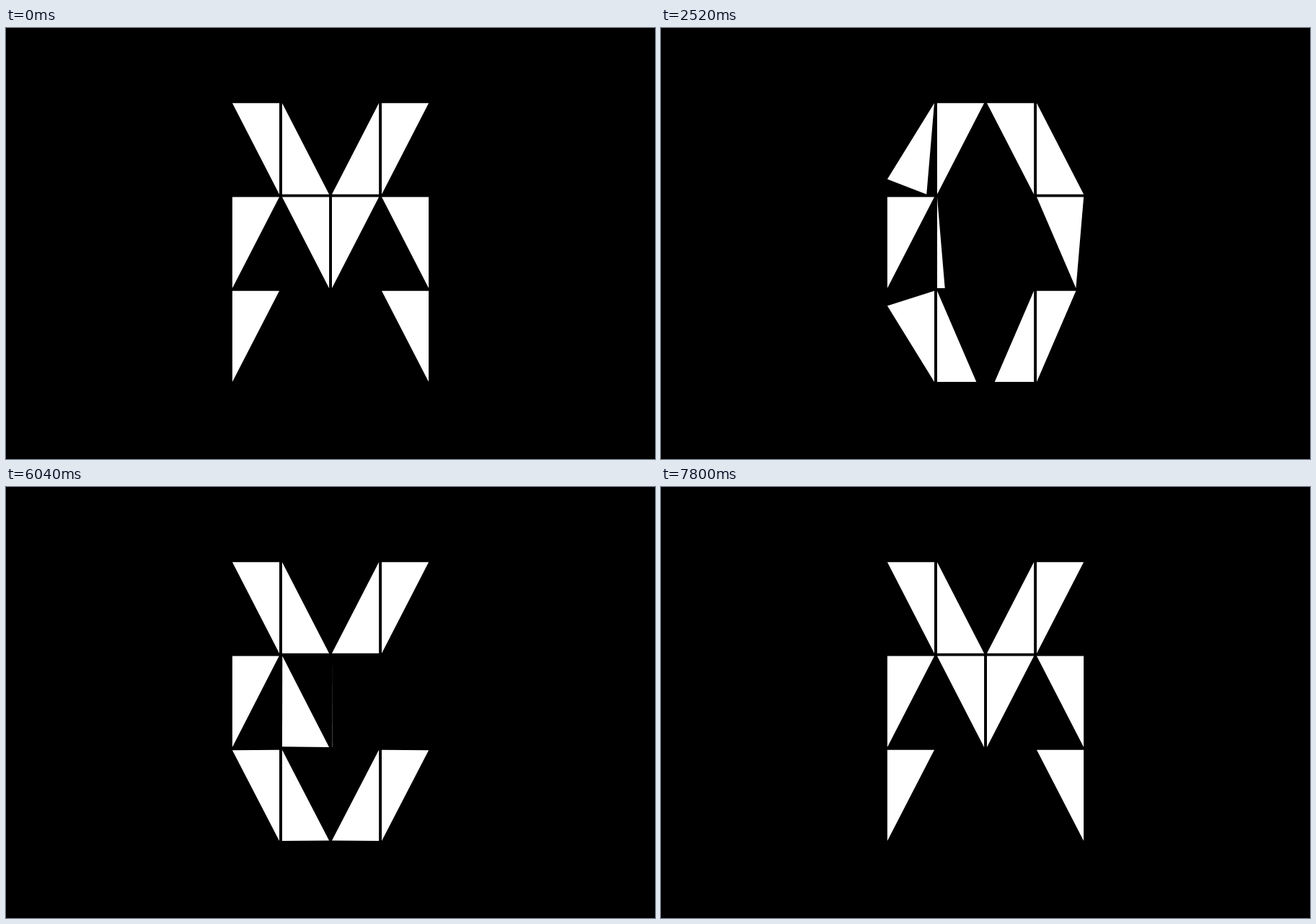
An HTML page with a canvas that plays this animation: 900x598 px, repeating every 8.44 s.

```html
<!DOCTYPE html>
<html lang="en">
<head>
<meta charset="utf-8">
<title>Triangle letters</title>
<style>
  html, body { margin: 0; width: 100%; height: 100%; overflow: hidden; background: #000; }
  canvas { display: block; }
</style>
</head>
<body>
<canvas id="stage" width="900" height="598"></canvas>
<script>
const ctx = document.getElementById('stage').getContext('2d');
const LOOP = 8440, STEP = 40, BEAT = 1200, DELAY = 15, MOVE = 560;
const LEFT = 313.9, TOP = 104.3, W = 65.1, H = 126.4, DX = 69.05, DY = 130.2;

const LETTERS = [
  '◥◣◢◤ ◤◥◤◥ ◤··◥', // M
  '◤◤◥◥ ◤◣◢◥ ◤··◥', // A
  '◢◤◥◣ ◤··◥ ◥◣◢◤', // O
  '◤◤◥◣ ◤◣·◤ ◢···', // P
  '◢◤◥◣ ◤··· ◥◣◢◤', // C
  '◥◣◢◤ ◤◣·· ◥◣◢◤', // E
  '◥◣◢◤ ·◥◣· ◢◤◥◣'  // X
].map(s => [...s.replaceAll(' ', '')].map(c => '◤◥◢◣'.indexOf(c)));

// Corners run clockwise from the top left; a shape is named by its right angle.
const turn = (corner, by) => (corner + by + 4) % 4;
const CORNERS = [[0, 0], [1, 0], [1, 1], [0, 1]];
const mix = (a, b, p) => a + (b - a) * p;

// Three [start corner, end corner] pairs that turn one shape into another.
function moves(from, to, dir) {
  if (to < 0) return moves(to, from, dir).map(([a, b]) => [b, a]);
  // Appear out of the upright edge.
  if (from < 0) return [[to, to], [3 - to, 3 - to], [to, to ^ 1]];
  // Opposite shapes swing round one fixed corner.
  if (turn(from, 2) === to) {
    return [-dir, 0, dir].map((d, i) => {
      const c = turn(from, d);
      return [c, i ? turn(c, dir) : c];
    });
  }
  // Neighbours share two corners, the third slides along an edge.
  return [-1, 0, 1].map(d => {
    const c = turn(from, d);
    return [c, c === turn(to, 2) ? turn(from, 2) : c];
  });
}

// cubic-bezier(.4, 0, 0, 1)
function ease(u) {
  if (u <= 0) return 0;
  if (u >= 1) return 1;
  let lo = 0, hi = 1;
  for (let i = 0; i < 24; i++) {
    const s = (lo + hi) / 2;
    if (1.2 * s * (1 - s) ** 2 + s ** 3 < u) lo = s; else hi = s;
  }
  return lo * lo * (3 - 2 * lo);
}

function draw(now) {
  const t = Math.floor(now % LOOP / STEP) * STEP;
  const k = Math.min(6, Math.floor(t / BEAT));
  const p = ease((t - k * BEAT - DELAY) / MOVE);
  const next = LETTERS[(k + 1) % LETTERS.length];

  ctx.fillStyle = '#000';
  ctx.fillRect(0, 0, 900, 598);
  ctx.fillStyle = '#fff';
  LETTERS[k].forEach((from, i) => {
    const to = next[i], col = i % 4;
    if (from < 0 && to < 0) return;
    const x = LEFT + col * DX, y = TOP + Math.floor(i / 4) * DY;
    ctx.beginPath();
    for (const [a, b] of moves(from, to, col < 2 ? 1 : -1)) {
      const [ax, ay] = CORNERS[a], [bx, by] = CORNERS[b];
      ctx.lineTo(x + W * mix(ax, bx, p), y + H * mix(ay, by, p));
    }
    ctx.fill();
  });
}

function tick() {
  draw(performance.now());
  requestAnimationFrame(tick);
}
tick();
</script>
</body>
</html>
```
